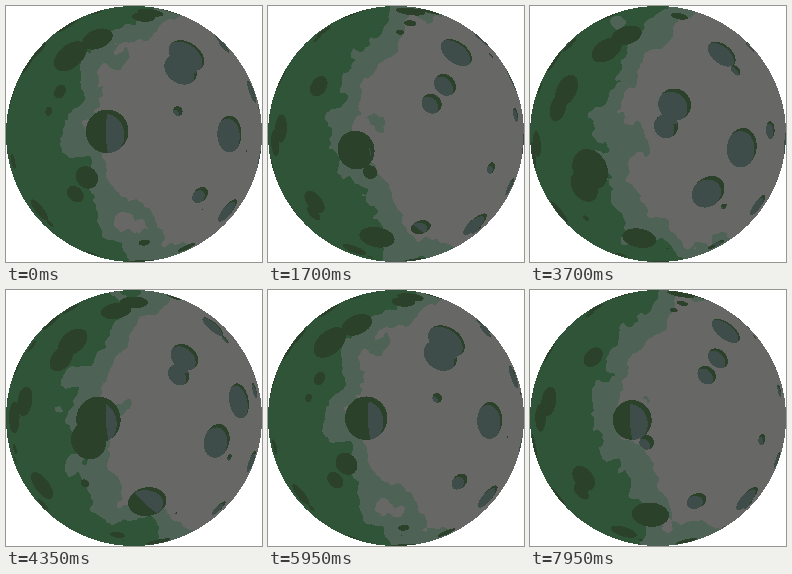
An HTML page with a canvas for the animation above (8000 ms loop, 256 px wide and 256 px high).

```html
<!DOCTYPE html>
<html>
<head>
<meta charset="utf-8">
<title>Rotating moon</title>
<style>
  html, body { margin: 0; height: 100%; overflow: hidden; background: #fff; }
  canvas { display: block; width: 256px; height: 256px; }
</style>
</head>
<body>
<canvas id="stage" width="256" height="256"></canvas>
<script>
const SIZE = 256;
const STEP_MS = 50, STEPS = 160, STEPS_PER_TURN = 120;
const SEED = 7.8;
const TILT = Math.PI - 0.767;          // direction of the texture's x axis
const GROUND_CELLS = 8, CRATER_CELLS = 5;
const SHADOW = 0.0107;                 // texture shift that casts crater rims

// Distances are in stage widths
const LIGHT = { x: 0.855, y: 0.49 };
const MID_BORDER = 0.615, DARK_BORDER = 0.729, CRATER_BORDER = 0.465;
const NOISE_GAIN = 0.3;

const GREY = [103, 103, 101], MID = [79, 98, 86], GREEN = [47, 84, 56];
const CRATER_LIT = [62, 77, 73], CRATER_DARK = [43, 65, 42];

const mod = (n, m) => ((n % m) + m) % m;
const fract = n => n - Math.floor(n);
const mix = (a, b, t) => a + (b - a) * t;
const smooth = t => t * t * (3 - 2 * t);

// Seeded random number per cell, repeating every `cells` in both directions
function randomLattice(cells) {
  const values = Array.from({ length: cells * cells }, (_, i) => {
    const x = i % cells, y = Math.floor(i / cells);
    return fract(Math.sin(x * 12.9898 + y * 78.233) * 15.5453 * SEED);
  });
  return (x, y) => values[mod(y, cells) * cells + mod(x, cells)];
}
const groundRandom = randomLattice(GROUND_CELLS);
const craterRandom = randomLattice(CRATER_CELLS);

function noise(x, y) {
  const ix = Math.floor(x), iy = Math.floor(y);
  const u = smooth(x - ix), v = smooth(y - iy);
  return mix(
    mix(groundRandom(ix, iy), groundRandom(ix + 1, iy), u),
    mix(groundRandom(ix, iy + 1), groundRandom(ix + 1, iy + 1), u),
    v
  );
}

function fbm(x, y) {
  let sum = 0;
  for (let octave = 0, gain = 0.5; octave < 4; octave++, gain /= 2) {
    sum += noise(x, y) * gain;
    x *= 2;
    y *= 2;
  }
  return sum;
}

// One crater per sheared cell; its random number sets both place and radius
function inCraterLayer(x, y) {
  const row = Math.floor(y);
  x += row * 0.31;
  const h = craterRandom(Math.floor(x), row);
  const center = 0.25 + h * 0.5;
  return Math.hypot(fract(x) - center, fract(y) - center) < h * 0.2375;
}

function inCrater(u, v, turn) {
  const x = (u + turn) * CRATER_CELLS, y = v * CRATER_CELLS;
  return inCraterLayer(x + 11, y + 11) || inCraterLayer(x + 12, y + 12);
}

// Everything about a pixel that does not depend on time
function makePixel(px, py) {
  const x = (px + 0.5) / SIZE - 0.5, y = (py + 0.5) / SIZE - 0.5;
  const r2 = 4 * (x * x + y * y);
  if (r2 >= 1) return null;
  const rx = x * Math.cos(TILT) + y * Math.sin(TILT);
  const ry = y * Math.cos(TILT) - x * Math.sin(TILT);
  const lens = 1 + Math.sqrt(1 - r2);
  const warp = fbm(rx + 0.5, ry + 0.5);
  return {
    offset: (py * SIZE + px) * 4,
    u: rx / lens + 0.5,
    v: ry / lens + 0.5,
    groundX: (rx + 0.5) * GROUND_CELLS + warp,
    groundY: (ry + 0.5) * GROUND_CELLS + warp,
    light: Math.hypot(x + 0.5 - LIGHT.x, y + 0.5 - LIGHT.y)
  };
}

const pixels = [];
for (let y = 0; y < SIZE; y++) {
  for (let x = 0; x < SIZE; x++) {
    const pixel = makePixel(x, y);
    if (pixel) pixels.push(pixel);
  }
}

function groundColor(p, turn) {
  if (p.light > DARK_BORDER) return GREEN;
  if (p.light + NOISE_GAIN < MID_BORDER) return GREY;
  const d = p.light + NOISE_GAIN * fbm(p.groundX + turn * GROUND_CELLS, p.groundY);
  return d > DARK_BORDER ? GREEN : d > MID_BORDER ? MID : GREY;
}

function pixelColor(p, turn) {
  if (!inCrater(p.u, p.v, turn)) return groundColor(p, turn);
  const shaded = p.light > CRATER_BORDER || !inCrater(p.u - SHADOW, p.v, turn);
  return shaded ? CRATER_DARK : CRATER_LIT;
}

const ctx = document.getElementById("stage").getContext("2d");
const image = ctx.createImageData(SIZE, SIZE);
let shownStep = -1;

function draw(step) {
  const turn = step / STEPS_PER_TURN;
  for (const p of pixels) {
    const color = pixelColor(p, turn);
    image.data[p.offset] = color[0];
    image.data[p.offset + 1] = color[1];
    image.data[p.offset + 2] = color[2];
    image.data[p.offset + 3] = 255;
  }
  ctx.putImageData(image, 0, 0);
}

const start = performance.now();
function tick() {
  const elapsed = Math.max(0, performance.now() - start);
  const step = Math.floor(elapsed / STEP_MS) % STEPS;
  if (step !== shownStep) draw(shownStep = step);
  requestAnimationFrame(tick);
}
tick();
</script>
</body>
</html>
```
